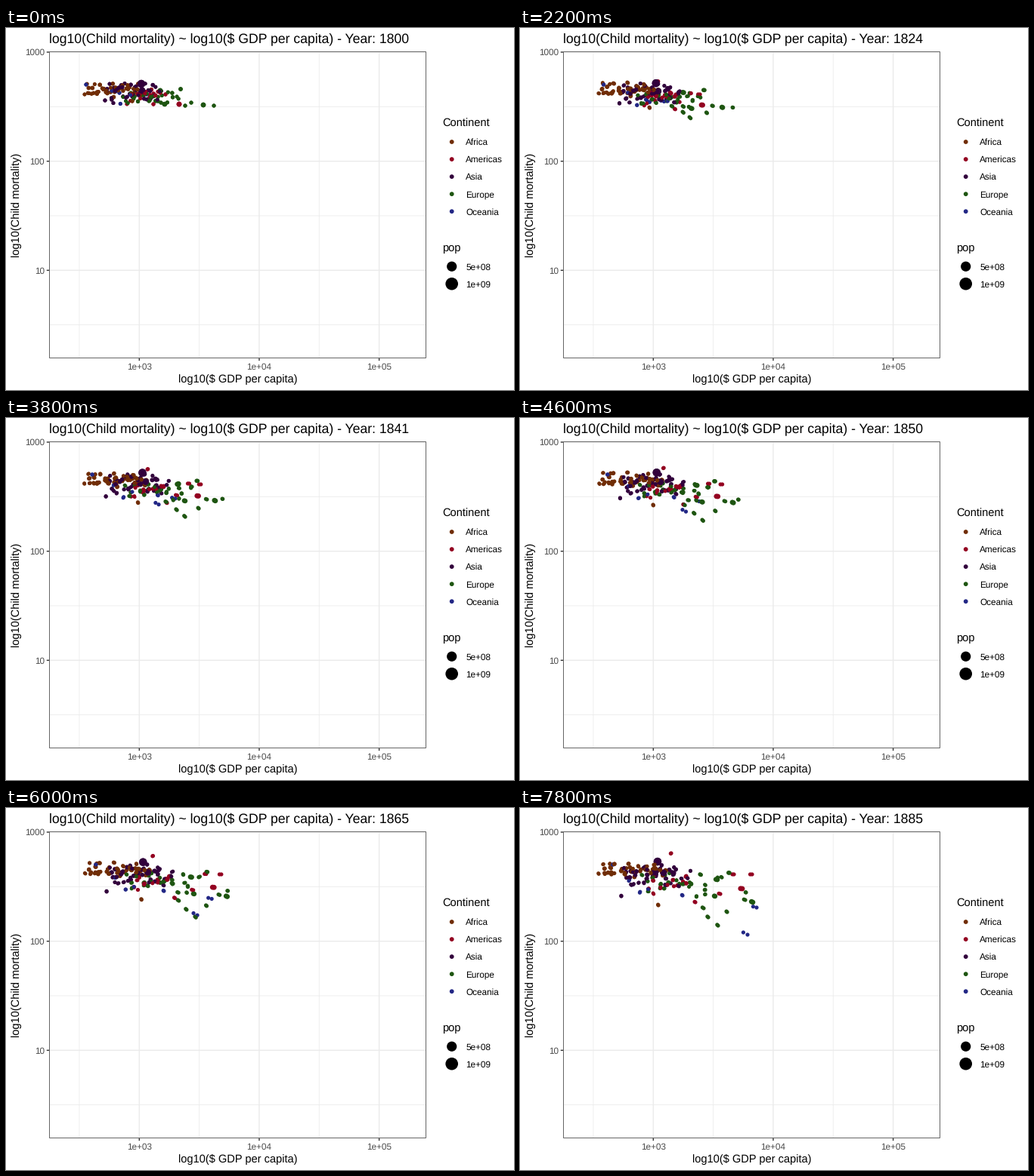
Animation, 672 px wide and 480 px high, one loop 8 s. Source, as a matplotlib script:

```python
import numpy as np
import matplotlib.pyplot as plt
from matplotlib.animation import FuncAnimation
from matplotlib.patches import Circle, Rectangle

W, H, DPI = 672, 480, 100
FRAMES, INTERVAL = 40, 200
PX = 72 / DPI  # points per pixel

plt.rcParams.update({"font.family": "Liberation Sans", "text.hinting": "none"})

COLORS = {
    "Africa": "#702D06",
    "Americas": "#930020",
    "Asia": "#32003C",
    "Europe": "#1E5511",
    "Oceania": "#222785",
}

# Crowd of each continent: count, x range, y mean and spread,
# range of the move to the right and of the move down over the loop
CROWDS = {
    "Africa": (46, (104, 182), (82.5, 4.5), (0, 22), (-1, 2)),
    "Americas": (14, (160, 202), (85, 6), (5, 35), (-3, 22)),
    "Asia": (40, (133, 204), (84, 6.5), (0, 25), (-3, 10)),
    "Europe": (24, (155, 228), (92, 4), (20, 45), (-5, 18)),
    "Oceania": (3, (140, 165), (88, 5), (2, 15), (5, 25)),
}

# Dots that leave the crowd: start, end, easing power, radius
LEADERS = {
    "Africa": [((167, 97), (183, 129), 1, 2.6)],
    "Americas": [((229, 101), (294, 107), 1.3, 3.4),
                 ((211, 88), (307, 88), 1, 2.6),
                 ((204, 86), (283, 88), 1, 2.6),
                 ((176, 75), (200, 60), 1, 2.6),
                 ((190, 92), (265, 114), 1, 2.6),
                 ((195, 101), (232, 125), 1, 2.6)],
    "Asia": [((179, 74), (182, 71), 1, 5.2),
             ((180, 83), (190, 86), 1, 4.4),
             ((131, 96), (134, 117), 1.3, 2.6)],
    "Europe": [((261, 102), (308, 125), 1.5, 3.3),
               ((275, 103), (299, 112), 1, 2.6),
               ((245, 99), (298, 122), 1.3, 2.6),
               ((237, 103), (274, 138), 1, 2.6),
               ((210, 101), (258, 117), 0.8, 3.2),
               ((205, 99), (262, 156), 0.8, 2.6),
               ((201, 97), (249, 145), 0.9, 2.6),
               ((190, 96), (243, 133), 1.2, 2.6),
               ((204, 83), (261, 95), 1.2, 3.3),
               ((231, 81), (277, 86), 1, 2.8)],
    "Oceania": [((150, 86), (313, 132), 1.1, 2.6),
                ((145, 84), (301, 168), 1.4, 2.6),
                ((106, 75), (123, 75), 1, 2.6),
                ((186, 88), (215, 116), 0.9, 2.6)],
}

rng = np.random.default_rng(11)
time = np.linspace(0, 1, FRAMES)[:, None]


def glide(start, end, power=1.0, wobble=0.0):
    """Eased path with a small year-to-year wobble that starts at rest."""
    start, end = np.array(start), np.array(end)
    phase = rng.uniform(0, 2 * np.pi, 2)
    sway = np.sin(12 * np.pi * time + phase) - np.sin(phase)
    return start + (end - start) * time ** power + wobble * sway


def build_dots():
    dots = []
    for name, color in COLORS.items():
        for start, end, power, radius in LEADERS[name]:
            dots.append((glide(start, end, power), color, radius))
        count, span, (mean, spread), right, down = CROWDS[name]
        # Even spacing with jitter keeps the crowd free of gaps.
        for x in np.linspace(*span, count):
            x += rng.uniform(-1.5, 1.5) if x > span[0] else 0
            y = np.clip(rng.normal(mean, spread), 72, 101)
            lag = (x - span[0]) / (span[1] - span[0])
            end = (x + rng.uniform(*right) * (0.3 + 0.7 * lag),
                   y + rng.uniform(*down))
            dots.append((glide((x, y), end, wobble=0.9), color, rng.uniform(2.4, 2.8)))
    order = rng.permutation(len(dots))
    paths, colors, radii = zip(*[dots[k] for k in order])
    return np.array(paths), list(colors), np.array(radii)


fig = plt.figure(figsize=(W / DPI, H / DPI), dpi=DPI, facecolor="white")
ax = fig.add_axes([0, 0, 1, 1])
ax.set(xlim=(0, W), ylim=(H, 0))
ax.axis("off")


def line(xs, ys, color, width):
    ax.plot(xs, ys, color=color, lw=width * PX, zorder=1,
            solid_capstyle="butt", snap=False)


def label(x, y, s, size, color="black", **kw):
    return ax.text(x, y, s, fontsize=size * PX, color=color, va="baseline", **kw)


def dot(x, y, r, color):
    ax.add_patch(Circle((x, y), r, color=color, lw=0))


LEFT, RIGHT, TOP, BOTTOM = 57.5, 555.5, 31.5, 437.5
GRID, INK, GREY, BORDER = "#EBEBEB", "#333333", "#4D4D4D", "#666666"
SMALL, MEDIUM, LARGE = 11.75, 14.67, 17.63
DECADE_X, DECADE_Y = 158.65, 144.65

for k in range(3):
    x, y = 176.3 + k * DECADE_X, 32 + k * DECADE_Y
    x_minor, y_minor = x - DECADE_X / 2, y + DECADE_Y / 2
    line([x_minor] * 2, [TOP, BOTTOM], GRID, 0.8)
    line([LEFT, RIGHT], [y_minor] * 2, GRID, 0.8)
    line([x, x], [TOP, BOTTOM], GRID, 1.45)
    line([LEFT, RIGHT], [y, y], GRID, 1.45)
    line([x, x], [BOTTOM, BOTTOM + 3.7], INK, 1.4)
    line([LEFT - 3.7, LEFT], [y, y], INK, 1.4)
    label(x, 453.3, f"1e+0{3 + k}", SMALL, GREY, ha="center")
    label(51, y + 4.2, str(10 ** (3 - k)), SMALL, GREY, ha="right")
ax.add_patch(Rectangle((LEFT, TOP), RIGHT - LEFT, BOTTOM - TOP, fill=False,
                       ec=BORDER, lw=PX, zorder=5, snap=False))

title = label(57, 20, "", LARGE)
label(306.5, 470, "log10($ GDP per capita)", MEDIUM, ha="center")
label(18, 234.5, "log10(Child mortality)", MEDIUM, ha="center",
      rotation=90, rotation_mode="anchor")

label(577.5, 131, "Continent", MEDIUM)
for k, (name, color) in enumerate(COLORS.items()):
    y = 151 + 23.05 * k
    dot(589.7, y, 2.9, color)
    label(608.3, y + 4.2, name, SMALL)
label(577.5, 296, "pop", MEDIUM)
for y, r, s in ((316.2, 6.6, "5e+08"), (339.2, 8.3, "1e+09")):
    dot(589.7, y, r, "black")
    label(608.3, y + 4.2, s, SMALL)

paths, colors, radii = build_dots()
sizes = np.tile((2 * radii * PX) ** 2, 2)
cloud = ax.scatter(np.zeros(len(sizes)), np.zeros(len(sizes)), s=sizes,
                   c=colors * 2, linewidths=0, zorder=3)


def draw(i):
    # Each dot leaves its previous position visible for one step.
    cloud.set_offsets(np.concatenate([paths[:, max(i - 1, 0)], paths[:, i]]))
    year = round(1800 + 85 * i / (FRAMES - 1))
    title.set_text(f"log10(Child mortality) ~ log10($ GDP per capita) - Year: {year}")
    return cloud, title


anim = FuncAnimation(fig, draw, frames=FRAMES, interval=INTERVAL,
                     init_func=lambda: draw(0), repeat=True, repeat_delay=0)
plt.show()
```
